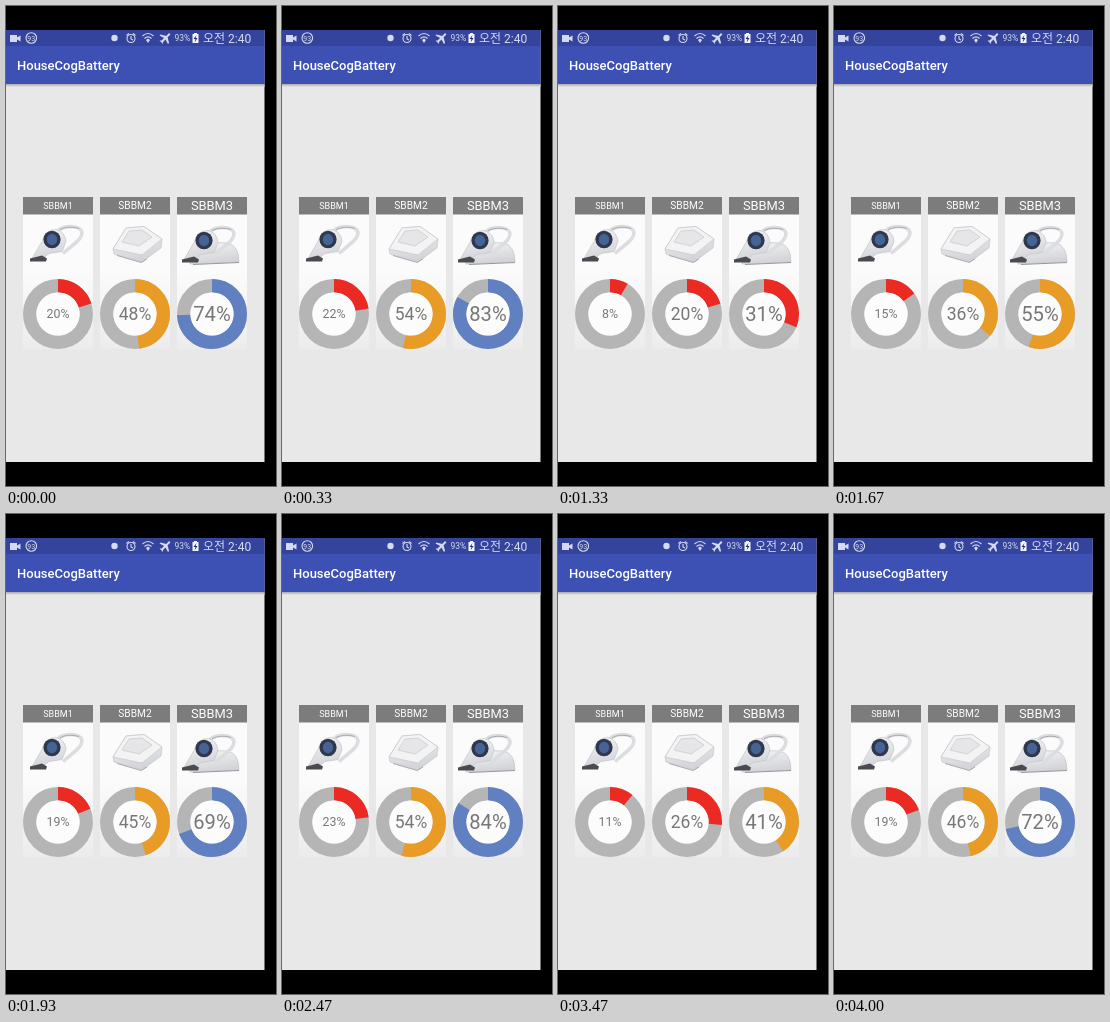
These frames come from a looping animation (270 by 480 pixels, 4070 ms). An HTML page:

```html
<!DOCTYPE html>
<html lang="en">
<head>
<meta charset="utf-8">
<title>Battery gauges</title>
<style>
  html, body { margin: 0; height: 100%; overflow: hidden; background: #000; }
  svg { display: block; width: 100vw; height: 100vh; font-family: Roboto, "Noto Sans CJK KR", "Noto Sans CJK", sans-serif; }
  .mid { text-anchor: middle; }
  .line { fill: none; stroke: #d5daf0; stroke-width: 1.1; }
  .ring { fill: none; stroke-width: 13.4; }
</style>
</head>
<body>
<svg viewBox="0 0 270 480">
  <defs>
    <linearGradient id="shadow" x2="0" y2="1">
      <stop stop-color="#a9a9ad"/><stop offset="1" stop-color="#e8e8e8"/>
    </linearGradient>
    <linearGradient id="card" x2="0" y2="1">
      <stop offset=".5" stop-color="#fbfbfb"/><stop offset="1" stop-color="#ececec"/>
    </linearGradient>
    <linearGradient id="shell" x2=".3" y2="1">
      <stop stop-color="#f6f6f7"/><stop offset="1" stop-color="#d3d4d8"/>
    </linearGradient>
    <g id="vacuum">
      <path d="M27 11Q29 2 41 2Q52 2 53 8Q53 13 47 18L34 29" fill="none" stroke="#dcdde0" stroke-width="3.6"/>
      <path d="M31 5Q40 1 50 4" fill="none" stroke="#a9abb1" stroke-width="1"/>
      <path d="M3 34L13 17Q16 5 27 5Q36 7 37 17L33 27L20 29L11 36Z" fill="url(#shell)" stroke="#c3c4c9" stroke-width=".7"/>
      <ellipse cx="23" cy="15" rx="8.6" ry="8.8" fill="#30384d"/>
      <ellipse cx="23" cy="15" rx="5.2" ry="5.8" fill="#456394"/>
      <path d="M1 34L13 31L18 34L17 37L1 37Z" fill="#494b50"/>
    </g>
  </defs>

  <rect y="24" width="258.5" height="432" fill="#e8e8e8"/>
  <rect y="24" width="258.5" height="16.5" fill="#34439c"/>
  <rect y="40" width="258.5" height="38" fill="#3d50b3"/>
  <rect y="78" width="258.5" height="3" fill="url(#shadow)"/>

  <g fill="#d5daf0">
    <path d="M4 29h7v2.5l3.5-2v6L11 33.500V36H4z"/>
    <circle class="line" cx="25.300" cy="32" r="5.300"/>
    <text class="mid" x="25.300" y="34.600" font-size="7">93</text>
    <circle cx="108.500" cy="32" r="3.200"/>
    <circle class="line" cx="125" cy="32.500" r="4"/>
    <path class="line" d="M125 30v3l2 1M120.500 29.500l2.500-2M129.500 29.500l-2.500-2"/>
    <path class="line" d="M136.500 30q5.500-5 11 0M138.500 32.500q3.500-3.200 7 0"/>
    <path d="M140 34l2-1.500 2 1.500-2 3z"/>
    <path transform="translate(159.500 32) rotate(45)" d="M-1-6h2v4l5 3v1.500l-5-1.500v3.500l1.500 1.500h-5L-1 4.500V1l-5 1.500V1l5-3z"/>
    <text x="168.500" y="35" font-size="8.500">93%</text>
    <path d="M186.500 28h1.500v-1h3v1h1.500v9h-6z" fill="#f4f5fb"/>
    <path d="M190.500 29l-3 4h2l-1 3.500 3-4.500h-2z" fill="#222b60"/>
    <text x="197" y="36.500" font-size="12">오전 2:40</text>
  </g>
  <text x="11" y="64" font-size="13" font-weight="500" fill="#fff">HouseCogBattery</text>

  <g id="cards"></g>

  <use href="#vacuum" x="23" y="218.500"/>
  <g stroke="#c6c7cb" stroke-width=".7">
    <path d="M107 243L120 222L138 220.500L156 233L155 242L136 256L108 248Z" fill="url(#shell)"/>
    <path d="M107 243L120 222L138 220.500L156 233L136 249Z" fill="#f3f3f4"/>
    <path d="M116 236L123 225L136 224L146 231L133 240Z" fill="#e6e6e8"/>
    <path d="M111 249.500L135 256.500L141 253" fill="none" stroke="#8e9096"/>
  </g>
  <path d="M184 252L192 236L222 237Q233 240 233 256L184 258Z" fill="url(#shell)" stroke="#c3c4c9" stroke-width=".7"/>
  <path d="M187 258.500L233 256.500" stroke="#97999e"/>
  <use href="#vacuum" x="175" y="219.500"/>
</svg>
<script>
const FRAME = 200 / 3, LOOP = 4070, FRAMES = 61;
const RISE = 24.45;                  // frames taken to fill a gauge
const STARTS = [15, 45.18];          // frames at which the gauges refill
const gauges = [
  { x: 52, max: 23, label: 9, size: 12.4 },
  { x: 129, max: 55, label: 10.2, size: 17.5 },
  { x: 206, max: 85, label: 12.9, size: 20.2 },
];
const cards = document.getElementById("cards");

cards.innerHTML = gauges.map(({ x, label, size }, i) => `
  <rect x="${x - 35}" y="191" width="70" height="152" fill="url(#card)"/>
  <rect x="${x - 35}" y="191" width="70" height="17.5" fill="#7c7c7c"/>
  <text class="mid" x="${x}" y="${199.8 + label * 0.36}" font-size="${label}" fill="#fff">SBBM${i + 1}</text>
  <circle class="ring" cx="${x}" cy="308" r="28.300" stroke="#b5b5b5"/>
  <circle class="ring arc" cx="${x}" cy="308" r="28.300" pathLength="100" transform="rotate(-90 ${x} 308)"/>
  <circle cx="${x}" cy="308" r="21.600" fill="#fcfcfc"/>
  <text class="mid value" x="${x}" y="${308 + size * 0.36}" font-size="${size}" fill="#777"></text>`).join("");

const arcs = cards.querySelectorAll(".arc");
const values = cards.querySelectorAll(".value");
const colorFor = value => value < 35 ? "#ec2a24" : value < 65 ? "#e99c25" : "#6080c1";

function progressAt(frame) {
  const [first, second] = STARTS;
  const start = frame < first ? second - FRAMES : frame < Math.floor(second) ? first : second;
  const p = Math.min(1, Math.max(0, (frame - start) / RISE));
  return 1 - (1 - p) ** 2;
}

function draw(now) {
  const frame = Math.floor((now % LOOP + 4) / FRAME) % FRAMES;
  const progress = progressAt(frame);
  gauges.forEach(({ max }, i) => {
    const value = max * progress;
    arcs[i].setAttribute("stroke", colorFor(value));
    arcs[i].setAttribute("stroke-dasharray", `${value} 100`);
    values[i].textContent = `${Math.round(value)}%`;
  });
}

const begin = performance.now();
function tick() {
  draw(performance.now() - begin);
  requestAnimationFrame(tick);
}
tick();
</script>
</body>
</html>
```
